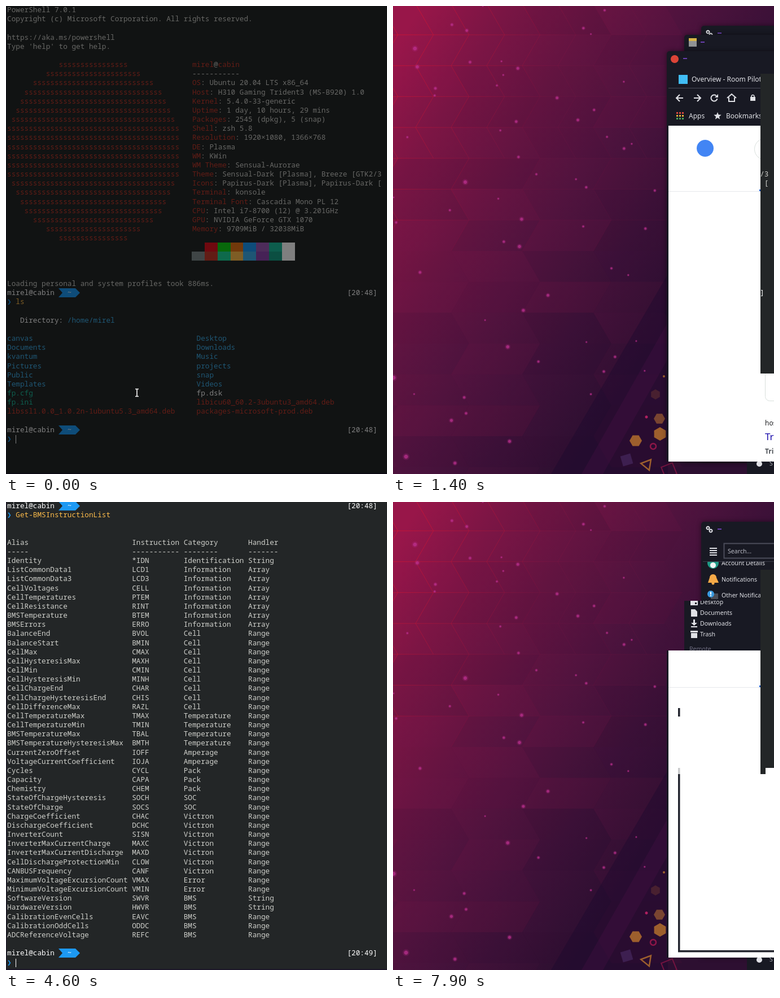
An HTML page with a canvas that plays this animation: 675x829 px, repeating every 8 s.

```html
<!DOCTYPE html>
<html lang="en">
<head>
<meta charset="utf-8">
<title>Terminal session</title>
<style>
html, body { margin: 0; width: 100%; height: 100%; overflow: hidden; background: #232627; }
canvas { display: block; width: 675px; height: 829px; }
</style>
</head>
<body>
<canvas id="stage" width="675" height="829"></canvas>
<script>
const W = 675, H = 829, LOOP = 8000;
const CW = 7.625, CH = 16.17;
const MONO = '500 12.7px "Noto Sans Mono", "DejaVu Sans Mono", "DejaVu Sans", monospace';
const UI = '"Noto Sans", "Open Sans", sans-serif';
const C = {
  bg: '#232627', text: '#cfd0cb', white: '#fff', red: '#c5392b', blue: '#1d99f3',
  sky: '#3daee9', teal: '#1abc9c', gold: '#fdbc4b', ghost: '#46484a',
  win: '#181923', ink: '#e0e1e6', violet: '#6a3fb0', mark: '#23252e'
};
const USER = 'mirel', HOST = 'cabin';

function layer(paint) {
  const c = document.createElement('canvas');
  c.width = W; c.height = H;
  paint(c.getContext('2d'));
  return c;
}

function box(g, x, y, w, h, color) {
  g.fillStyle = color;
  g.fillRect(x, y, w, h);
}

function path(g, pts, close) {
  g.beginPath();
  pts.forEach(([x, y]) => g.lineTo(x, y));
  if (close) g.closePath();
}

function line(g, pts, color, width = 1, close = false) {
  path(g, pts, close);
  g.strokeStyle = color;
  g.lineWidth = width;
  g.stroke();
}

function shape(g, pts, color) {
  path(g, pts, true);
  g.fillStyle = color;
  g.fill();
}

function ring(x, y, r, n, turn = 0) {
  return Array.from({ length: n }, (_, i) => {
    const a = turn + i * 2 * Math.PI / n;
    return [x + r * Math.cos(a), y + r * Math.sin(a)];
  });
}

const disc = (g, x, y, r, color) => shape(g, ring(x, y, r, 24), color);

function label(g, s, x, y, size, color = C.ink, weight = '') {
  g.font = `${weight} ${size}px ${UI}`;
  g.fillStyle = color;
  g.fillText(s, x, y);
}

function clipped(g, x, y, w, h, paint) {
  g.save();
  g.beginPath();
  g.rect(x, y, w, h);
  g.clip();
  paint();
  g.restore();
}

// ---- terminal ----

function put(g, row, col, s, color = C.text) {
  g.font = MONO;
  g.fillStyle = color;
  [...s].forEach((ch, i) => {
    if (ch !== ' ') g.fillText(ch, 2 + (col + i) * CW, 11 + row * CH);
  });
}

function prompt(g, row, time) {
  const y = Math.round(row * CH) - 1, m = y + 8, b = y + 16;
  put(g, row, 0, USER + '@' + HOST, C.white);
  shape(g, [[93, y], [123, y], [131, m], [123, b], [93, b], [100, m]], C.blue);
  put(g, row, 14, '~', C.white);
  put(g, row, 79, `[${time}]`, C.white);
  put(g, row + 1, 0, '❯', C.blue);
}

function terminal(g) {
  box(g, 0, 0, W, H, C.bg);
  box(g, 0, 0, 1, H, '#1b1628');
  box(g, 0, 827, W, 2, '#1b1628');
}

const INFO = `OS: Ubuntu 20.04 LTS x86_64
Host: H310 Gaming Trident3 (MS-B920) 1.0
Kernel: 5.4.0-33-generic
Uptime: 1 day, 10 hours, 29 mins
Packages: 2545 (dpkg), 5 (snap)
Shell: zsh 5.8
Resolution: 1920×1080, 1366×768
DE: Plasma
WM: KWin
WM Theme: Sensual-Aurorae
Theme: Sensual-Dark [Plasma], Breeze [GTK2/3
Icons: Papirus-Dark [Plasma], Papirus-Dark [
Terminal: konsole
Terminal Font: Cascadia Mono PL 12
CPU: Intel i7-8700 (12) @ 3.201GHz
GPU: NVIDIA GeForce GTX 1070
Memory: 9709MiB / 32038MiB`.split('\n');

const PALETTE = [
  [C.bg, '#e0121e', '#11d116', '#e67216', C.blue, '#9b59b6', C.teal, C.white],
  ['#7f8c8d', C.red, '#1cd699', C.gold, C.sky, '#8e44ad', '#16a085', C.white]
];

const FILES = `canvas Desktop
Documents Downloads
kvantum Music
Pictures projects
Public snap
Templates Videos
fp.cfg fp.dsk
fp.ini libicu60_60.2-3ubuntu3_amd64.deb
libssl1.0.0_1.0.2n-1ubuntu5.3_amd64.deb packages-microsoft-prod.deb`.split('\n');

function fileColor(name) {
  if (name.endsWith('.deb')) return C.red;
  if (name.endsWith('.dsk')) return C.white;
  return name.includes('.') ? C.teal : C.sky;
}

const home = layer(g => {
  terminal(g);
  put(g, 0, 0, 'PowerShell 7.0.1');
  put(g, 1, 0, 'Copyright (c) Microsoft Corporation. All rights reserved.');
  put(g, 3, 0, 'https://aka.ms/powershell');
  put(g, 4, 0, "Type 'help' to get help.");

  // plain disc of letters
  for (let r = 6; r < 26; r++) {
    const dy = (r - 15.5) * CH / 167;
    const h = Math.min(20, Math.round(154 * Math.sqrt(1 - dy * dy) / CW));
    put(g, r, 20 - h, 's'.repeat(2 * h), C.red);
  }

  put(g, 6, 43, USER, C.red);
  put(g, 6, 48, '@');
  put(g, 6, 49, HOST, C.red);
  put(g, 7, 43, '-'.repeat(11));
  INFO.forEach((s, i) => {
    const n = s.indexOf(':');
    put(g, 8 + i, 43, s.slice(0, n), C.red);
    put(g, 8 + i, 43 + n, s.slice(n));
  });
  PALETTE.forEach((row, j) => row.forEach((color, i) =>
    box(g, Math.floor(329.7 + i * 22.8), 419 + j * 16, 23, 16, color)));

  put(g, 30, 0, 'Loading personal and system profiles took 886ms.');
  prompt(g, 31, '20:48');
  put(g, 32, 2, 'ls', C.gold);
  put(g, 34, 3, 'Directory:', C.white);
  put(g, 34, 14, '/home/' + USER, C.sky);
  FILES.forEach((pair, i) => pair.split(' ').forEach((name, j) =>
    put(g, 36 + i, j * 44, name, fileColor(name))));
  prompt(g, 46, '20:48');
});

// handler, category, then alias:code
const TABLE = `String Identification Identity:*IDN
Array Information ListCommonData1:LCD1 ListCommonData3:LCD3 CellVoltages:CELL CellTemperatures:PTEM CellResistance:RINT BMSTemperature:BTEM BMSErrors:ERRO
Range Cell BalanceEnd:BVOL BalanceStart:BMIN CellMax:CMAX CellHysteresisMax:MAXH CellMin:CMIN CellHysteresisMin:MINH CellChargeEnd:CHAR CellChargeHysteresisEnd:CHIS CellDifferenceMax:RAZL
Range Temperature CellTemperatureMax:TMAX CellTemperatureMin:TMIN BMSTemperatureMax:TBAL BMSTemperatureHysteresisMax:BMTH
Range Amperage CurrentZeroOffset:IOFF VoltageCurrentCoefficient:IOJA
Range Pack Cycles:CYCL Capacity:CAPA Chemistry:CHEM
Range SOC StateOfChargeHysteresis:SOCH StateOfCharge:SOCS
Range Victron ChargeCoefficient:CHAC DischargeCoefficient:DCHC InverterCount:SISN InverterMaxCurrentCharge:MAXC InverterMaxCurrentDischarge:MAXD CellDischargeProtectionMin:CLOW CANBUSFrequency:CANF
Range Error MaximumVoltageExcursionCount:VMAX MinimumVoltageExcursionCount:VMIN
String BMS SoftwareVersion:SWVR HardwareVersion:HWVR
Range BMS CalibrationEvenCells:EAVC CalibrationOddCells:ODDC ADCReferenceVoltage:REFC`;

const table = layer(g => {
  terminal(g);
  prompt(g, 0, '20:48');
  put(g, 1, 2, 'Get-BMSInstructionList', C.gold);
  const cols = [0, 29, 41, 56];
  const show = (row, cells) => cells.forEach((s, i) => put(g, row, cols[i], s));
  const head = ['Alias', 'Instruction', 'Category', 'Handler'];
  show(4, head);
  show(5, head.map(s => '-'.repeat(s.length)));
  let row = 6;
  for (const group of TABLE.split('\n')) {
    const [handler, category, ...items] = group.split(' ');
    for (const item of items) show(row++, [...item.split(':'), category, handler]);
  }
});

const tableDone = layer(g => {
  g.drawImage(table, 0, 0);
  prompt(g, 49, '20:49');
});

// ---- desktop ----

function facets(g, rnd) {
  const step = 54.7, lean = 31.6, wide = 126;
  const edge = g.createLinearGradient(0, 60, 270, 200);
  edge.addColorStop(0, 'rgba(215,20,50,.75)');
  edge.addColorStop(0.6, 'rgba(180,20,55,.4)');
  edge.addColorStop(1, 'rgba(150,20,70,.12)');
  for (let k = -1; k < 15; k++) {
    const y = 51 + k * step, d = k % 2 ? lean : -lean;
    for (let i = -1; i < 4; i++) {
      const x = 103 + (i - 1) * wide + (k % 2 ? 0 : lean);
      const v = rnd() - 0.5, a = Math.abs(v) * 0.13;
      shape(g, [[x, y], [x + wide, y], [x + wide + d, y + step], [x + d, y + step]],
        v > 0 ? `rgba(190,25,80,${a})` : `rgba(40,8,45,${a})`);
      if (k < 7) line(g, [[x + wide, y], [x, y], [x + d, y + step]], edge);
      if (k < 4) line(g, [[x + wide / 2, y], [x + wide / 2 + d, y + step]], edge);
    }
  }
}

function stars(g, rnd) {
  for (let i = 0; i < 62; i++) {
    const x = 470 * rnd() ** 1.3, y = 820 * rnd() ** 1.3;
    const r = 1.2 + 2.4 * rnd() * (1 - x / 700);
    disc(g, x, y, r * 1.7, 'rgba(175,40,130,.25)');
    disc(g, x, y, r, 'rgba(190,50,145,.7)');
  }
}

const wallpaper = layer(g => {
  const grad = g.createLinearGradient(0, 80, 560, 430);
  const tones = ['#99164a', '#7b1545', '#641441', '#50133e', '#3d1138', '#2d0f31'];
  tones.forEach((c, i) => grad.addColorStop(i / 5, c));
  box(g, 0, 0, W, H, grad);

  let seed = 11;
  const rnd = () => (seed = seed * 16807 % 2147483647) / 2147483647;
  facets(g, rnd);
  shape(g, [[487, 475], [280, 829], [487, 829]], 'rgba(25,10,45,.38)');
  shape(g, [[487, 560], [487, 625], [372, 829], [334, 829]], 'rgba(75,18,70,.3)');
  stars(g, rnd);

  const amber = '#9d5f2d';
  shape(g, ring(430, 770, 11, 6), amber);
  shape(g, ring(473, 758, 12, 6, 0.52), amber);
  shape(g, ring(472, 731, 10, 6), '#7a4531');
  shape(g, ring(465, 688, 9, 6, 0.52), '#482030');
  shape(g, ring(414, 804, 13, 4, 0.5), '#3d1f50');
  line(g, ring(450, 812, 11, 3, 3.3), amber, 2.5, true);
  line(g, ring(489, 823, 15, 4, 0.4), '#741440', 2, true);
  line(g, ring(461, 780, 5, 16), '#8d1648', 2.5, true);
  disc(g, 480, 656, 2, amber);
  disc(g, 449, 728, 2.5, '#b02060');
});

function frameWin(g, x, y) {
  g.save();
  g.shadowColor = 'rgba(0,0,0,.45)';
  g.shadowBlur = 8;
  g.beginPath();
  g.roundRect(x, y, W - x + 20, 807 - y, [5, 0, 0, 0]);
  g.fillStyle = C.win;
  g.fill();
  g.restore();
  box(g, x + 29, y + 12, 7, 2, C.violet);
}

function settingsBar(g) {
  frameWin(g, 546, 35);
  line(g, ring(558, 46, 2.5, 12), C.ink, 2, true);
  line(g, ring(563, 51, 2.5, 12), C.ink, 2, true);
}

// arrow pointing left (-1) or right (1)
function arrow(g, x, y, d) {
  line(g, [[x - 6 * d, y], [x + 6 * d, y]], C.ink, 2);
  line(g, [[x, y - 6], [x + 6 * d, y], [x, y + 6]], C.ink, 2);
}

function page(g, top) {
  box(g, 485, top, 3, 807 - top, C.win);
  box(g, 488, top, W - 488, 807 - top, '#fff');
  box(g, 488, 328, 163, 1, '#e6e8eb');
  box(g, 649, 325, 3, 3, '#1a57c8');
  box(g, 627, 807, 48, 22, C.win);
  clipped(g, 627, 807, 48, 22, () => disc(g, 649, 811, 5, C.ink));
  label(g, 'S', 667, 814, 10.6, '#aaacb4');
}

const desktop = layer(g => {
  g.drawImage(wallpaper, 0, 0);
  settingsBar(g);
  frameWin(g, 516, 51);
  box(g, 524, 57, 14, 5, '#d9b548');
  box(g, 524, 62, 14, 10, '#8f9294');
  frameWin(g, 485, 80);
  disc(g, 499, 94, 7, '#db4437');

  box(g, 506, 122, 16, 16, '#41bdf5');
  label(g, 'Overview - Room Pilot', 529, 134, 12);
  box(g, 488, 145, 163, 1, '#4a4b58');
  arrow(g, 508, 163, -1);
  arrow(g, 539, 163, 1);
  line(g, ring(569, 163, 5.5, 24, 0.2).slice(0, 21), C.ink, 2);
  shape(g, [[576, 156], [576, 162], [570, 162]], C.ink);
  line(g, [[592, 163], [600, 156], [608, 163]], C.ink, 2);
  line(g, [[595, 162], [595, 169], [605, 169], [605, 162]], C.ink, 2);
  box(g, 633, 161, 9, 7, C.ink);
  line(g, ring(637.5, 160, 2.5, 12), C.ink, 1.5, true);

  const dots = ['#e04a3f', '#e9b23b', '#49a85c'];
  for (let i = 0; i < 9; i++) {
    const row = Math.floor(i / 3);
    box(g, 502 + i % 3 * 5, 188 + row * 5, 3, 3, dots[row]);
  }
  label(g, 'Apps', 524, 199, 12);
  const outer = ring(575, 195, 7, 5, -Math.PI / 2), inner = ring(575, 195, 3, 5, -Math.PI * 0.3);
  shape(g, outer.flatMap((p, i) => [p, inner[i]]), C.ink);
  label(g, 'Bookmarks', 590, 199, 12);

  page(g, 212);
  disc(g, 553, 252, 15, '#4285f4');
  g.strokeStyle = '#d9e0dc';
  g.lineWidth = 1;
  g.beginPath();
  g.roundRect(640.5, 234.5, 60, 38, 19);
  g.roundRect(659.5, 600.5, 60, 99, 8);
  g.stroke();
  label(g, 'host', 659, 743, 12, '#202124');
  label(g, 'Trig', 659, 769, 17, '#1a0dab');
  label(g, 'Trig', 659, 793, 12, '#4d5156', 'bold');
  put(g, 31, 85, ']', C.bg);
  g.drawImage(home, 651, 120, 24, 531, 651, 120, 24, 531);
});

const desktopTorn = layer(g => {
  g.drawImage(wallpaper, 0, 0);
  settingsBar(g);
  for (let i = 0; i < 4; i++) box(g, 561, 81 + i * 4, 13, 2, C.ink);
  g.strokeStyle = '#4b4d5a';
  g.strokeRect(586.5, 73.5, 100, 26);
  label(g, 'Search...', 593, 91, 10.6, '#b9bbc4');
  box(g, 549, 105, 126, 1, '#3c3d49');

  clipped(g, 546, 106, 129, 69, () => {
    ['Account Details', 'Notifications', 'Other Notifications'].forEach((s, i) =>
      label(g, s, 582, 112 + i * 28.7, 10.6));
    disc(g, 567, 108, 10, '#1f9a86');
    disc(g, 567, 112, 5, '#f2f4f4');
    disc(g, 567, 134, 6, '#f5a947');
    shape(g, [[561, 134], [573, 134], [577, 143], [558, 143]], '#f5a947');
    disc(g, 567, 144, 2.5, '#f5a947');
    box(g, 563, 162, 13, 10, '#4a4d57');
    disc(g, 563, 163, 6, '#3a9be0');
    box(g, 562, 159, 2, 5, '#fff');
    box(g, 562, 165, 2, 2, '#fff');
  });

  clipped(g, 516, 175, 159, 88, () => {
    box(g, 516, 175, 159, 88, C.win);
    ['Desktop', 'Documents', 'Downloads', 'Trash'].forEach((s, i) =>
      label(g, s, 544, 181 + i * 19, 10.6));
    box(g, 527, 173, 13, 10, C.ink);
    box(g, 535, 178, 3, 3, C.win);
    shape(g, [[528, 190], [535, 190], [539, 194], [539, 203], [528, 203]], C.ink);
    box(g, 532, 208, 3, 8, C.ink);
    shape(g, [[528, 214], [539, 214], [533.5, 219]], C.ink);
    box(g, 528, 220, 11, 2, C.ink);
    box(g, 527, 228, 13, 3, C.ink);
    box(g, 528, 232, 11, 9, C.ink);
    label(g, 'Remote', 525, 264, 10.6, '#6d6c80');
  });

  page(g, 263);
  box(g, 505, 365, 3.5, 15, C.mark);
  box(g, 505, 471, 3.5, 11, '#c9cacc');
  box(g, 505, 482, 3.5, 315, C.mark);
  box(g, 505, 794, 170, 3.5, C.mark);
  box(g, 651, 120, 24, 351, C.bg);
  box(g, 651, 471, 9, 11, C.bg);
});

// ---- playback ----

const COMMAND = 'Get-BMSInstructionList';
const OLDER = 'Get-BMSCell -Format String';
const STEPS = ['', 'g', 'get', 'get-bm', 'get-bms', 'get-bmsi'];
const BLINKS = [[700, 1200], [3000, 3200], [5100, 5600]];
const within = (t, a, b) => t >= a && t < b;
const typedAt = (t, times) => STEPS[times.filter(k => k <= t).length];

function pointer(g) {
  const x = 232, top = 678.5, foot = 691.5;
  const stem = [[x - 3, top], [x + 3, top], [x, top], [x, foot], [x - 3, foot], [x + 3, foot]];
  line(g, stem, '#111', 3.5);
  line(g, stem, '#fff', 1.6);
}

function input(g, t, row, typed, hint) {
  put(g, row, 2, typed, C.gold);
  if (typed) put(g, row, 2 + typed.length, hint.slice(typed.length), C.ghost);
  if (BLINKS.some(([a, b]) => within(t, a, b))) return;
  box(g, Math.round(2 + (2 + typed.length) * CW), Math.round(row * CH), 1, 15, C.white);
}

const ctx = document.getElementById('stage').getContext('2d');
const show = img => ctx.drawImage(img, 0, 0);

function draw(t) {
  if (within(t, 1400, 1500)) return show(desktop);
  if (within(t, 4500, 4600)) return show(table);
  if (t >= 7900) return show(desktopTorn);

  if (t >= 4600) {
    show(tableDone);
    return input(ctx, t, 50, typedAt(t, [6500, 6700, 7100, 7500, 7800]), COMMAND);
  }
  show(home);
  const typed = t < 3900 ? typedAt(t, [1200, 1400, 1900, 2400, 3600]) : COMMAND;
  input(ctx, t, 47, typed, t < 3600 ? OLDER : '');
  if (t < 300) box(ctx, 0, 0, W, H, 'rgba(0,0,0,.5)');
  if (t < 1200) pointer(ctx);
}

const start = performance.now();
function tick() {
  draw((performance.now() - start) % LOOP);
  requestAnimationFrame(tick);
}
tick();
</script>
</body>
</html>
```
